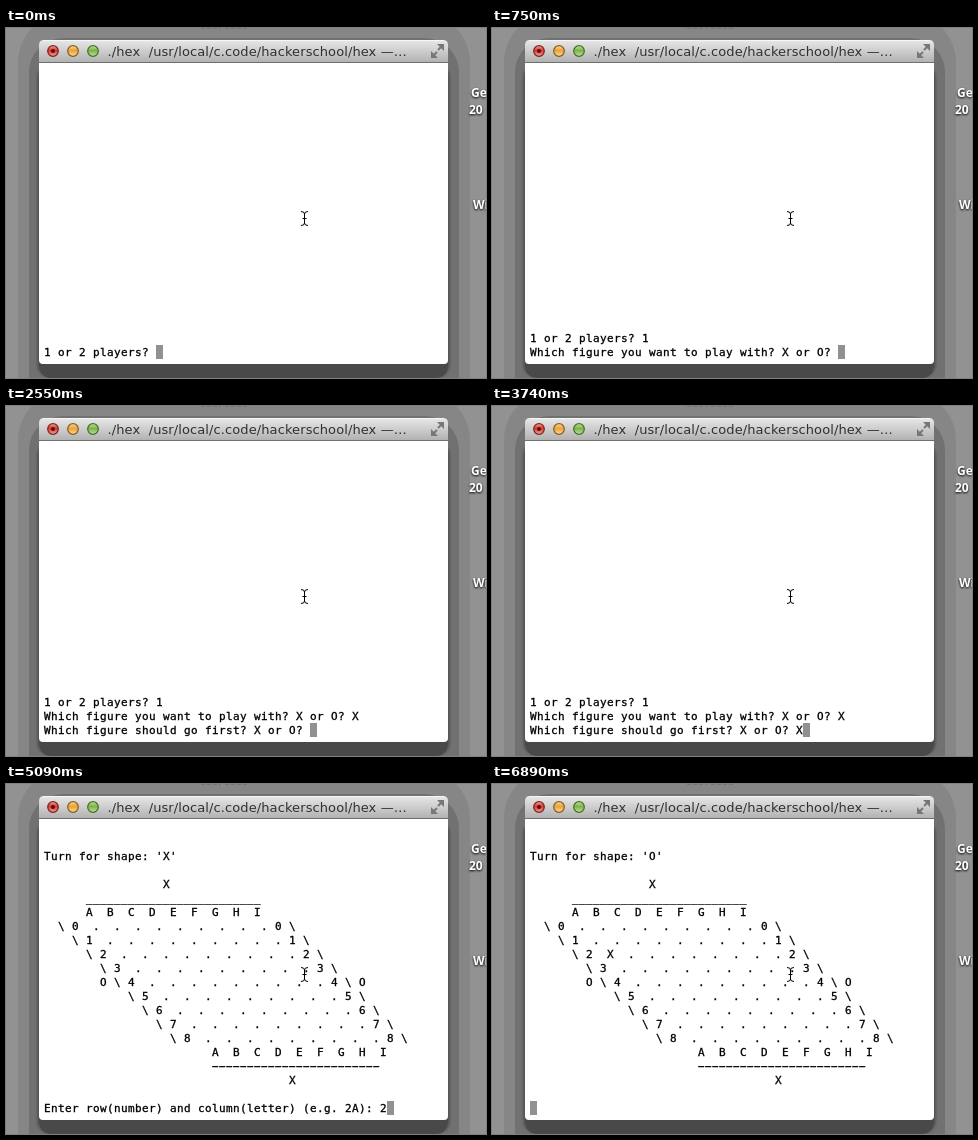
Write an HTML page that moves like this. It is 480 px wide and 350 px high and loops after 8000 ms.

```html
<!DOCTYPE html>
<html lang="en">
<head>
<meta charset="utf-8">
<title>Hex</title>
<style>
html, body { margin: 0; width: 100%; height: 100%; overflow: hidden; background: #929292; }
svg { position: absolute; left: 0; top: 0; }
pre {
  position: absolute; left: 38px; bottom: calc(100% - 331px); margin: 0;
  font: 11px/14px "DejaVu Sans Mono", monospace; color: #000;
  letter-spacing: calc(7px - 1ch); /* 7px terminal cells */
  -webkit-text-stroke: .3px #000;
}
#out { position: relative; top: 1px; }
#caret { display: inline-block; width: 7px; height: 14px; background: #919191; vertical-align: top; }
.title { font: 13px "DejaVu Sans", sans-serif; letter-spacing: .1px; fill: #303030; }
.icon { font: bold 12px "Open Sans", sans-serif; fill: #fff; filter: drop-shadow(0 1px 1px #000); }
</style>
</head>
<body>
<svg width="480" height="350">
  <defs>
    <linearGradient id="bar" x2="0" y2="1">
      <stop stop-color="#e8e8e8"/><stop offset="1" stop-color="#b2b2b2"/>
    </linearGradient>
    <linearGradient id="shine" x2="0" y2="1">
      <stop stop-color="#fff" stop-opacity=".45"/><stop offset=".45" stop-color="#fff" stop-opacity="0"/>
      <stop offset="1" stop-color="#fff" stop-opacity=".5"/>
    </linearGradient>
    <filter id="soft"><feGaussianBlur stdDeviation="1"/></filter>
  </defs>
  <rect x="12" y="-14" width="452" height="420" rx="48" fill="#868686"/>
  <rect x="23" y="10" width="430" height="400" rx="34" fill="#717171"/>
  <rect x="31" y="36" width="413" height="314" rx="14" fill="#525252" filter="url(#soft)"/>
  <path d="M33 328H442V336Q442 350 428 350H47Q33 350 33 336Z" fill="#494949"/>
  <path d="M195 0h20m4 0h22" stroke="#747474" stroke-width="2" stroke-dasharray="4 2"/>
  <g class="icon">
    <text x="465" y="69">Ge</text><text x="463" y="86">20</text><text x="467" y="181">Wi</text>
  </g>
  <path d="M33 34V17Q33 12 38 12H437Q442 12 442 17V34Z" fill="url(#bar)"/>
  <path d="M37 12.5H438" stroke="#f6f6f6"/>
  <path d="M33 34.5H442" stroke="#707070"/>
  <path d="M33 35H442V332Q442 336 438 336H37Q33 336 33 332Z" fill="#fff"/>
  <g stroke-width="1.2">
    <circle cx="47" cy="23" r="5.3" fill="#d8382f" stroke="#7c211d"/>
    <circle cx="67" cy="23" r="5.3" fill="#eba533" stroke="#85591a"/>
    <circle cx="87" cy="23" r="5.3" fill="#7ab544" stroke="#426d24"/>
  </g>
  <g fill="url(#shine)">
    <circle cx="47" cy="23" r="4.7"/><circle cx="67" cy="23" r="4.7"/><circle cx="87" cy="23" r="4.7"/>
  </g>
  <circle cx="47" cy="23" r="2" fill="#5a0d0b"/>
  <text class="title" x="101.5" y="28" xml:space="preserve">./hex  /usr/local/c.code/hackerschool/hex —…</text>
  <path d="M431 16H438V23ZM425 23V30H432Z" fill="#777"/>
  <path d="M436 18L432 22M427 28L431 24" stroke="#777" stroke-width="2"/>
</svg>
<pre><span id="out"></span><span id="caret"></span></pre>
<svg width="480" height="350">
  <path d="M295 183.500Q298.500 183.500 298.500 186V195Q298.500 197.500 295 197.500M302 183.500Q298.500 183.500 298.500 186M302 197.500Q298.500 197.500 298.500 195M296.500 190.500H300.500" fill="none" stroke="#000"/>
</svg>
<script>
const LOOP = 8000;
const pad = n => " ".repeat(n);
const letters = [..."ABCDEFGHI"].join("  ");

function board(turn, moved) {
  const rows = Array.from({ length: 9 }, (_, r) => {
    const cells = Array(9).fill(".");
    if (moved && r === 2) cells[0] = "X";
    const side = r === 4;
    const indent = side ? pad(8) + "O " : pad(2 + 2 * r);
    return `${indent}\\ ${r}  ${cells.join("  ")} ${r} \\${side ? " O" : ""}`;
  });
  return [
    `Turn for shape: '${turn}'`, "", pad(17) + "X",
    pad(6) + "_".repeat(25), pad(6) + letters,
    ...rows,
    pad(24) + letters, pad(24) + "−".repeat(24), pad(35) + "X", "", ""
  ].join("\n");
}

const players = "1 or 2 players? ";
const figure = players + "1\nWhich figure you want to play with? X or O? ";
const first = figure + "X\nWhich figure should go first? X or O? ";
const move = board("X") + "Enter row(number) and column(letter) (e.g. 2A): ";

const steps = [
  [0, players], [450, players + "1"],
  [750, figure], [2250, figure + "X"],
  [2550, first], [3740, first + "X"],
  [4040, move], [5090, move + "2"], [5990, move + "2A"],
  [6890, board("O", true)]
];

const out = document.getElementById("out");
const start = performance.now();
let shown;

function draw() {
  const t = Math.max(0, performance.now() - start) % LOOP;
  const text = steps.findLast(([at]) => t >= at)[1];
  if (text !== shown) out.textContent = shown = text;
  requestAnimationFrame(draw);
}
draw();
</script>
</body>
</html>
```
